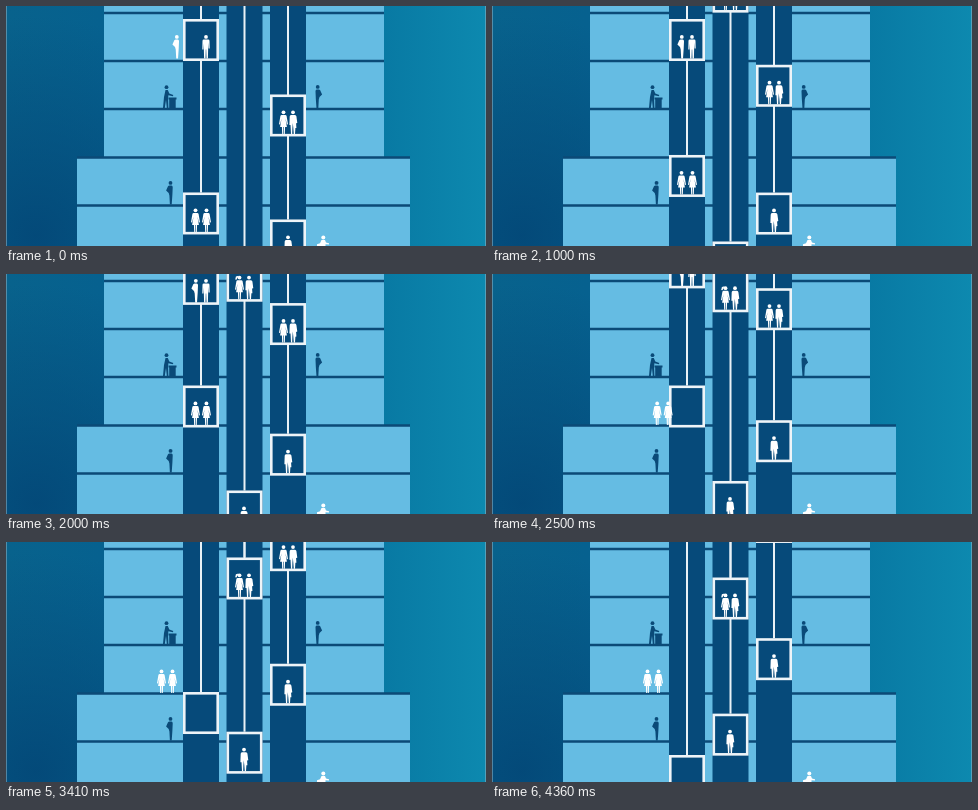
Animation of 480 by 240 pixels, one loop 4400 ms. Source, as an HTML page:

```html
<!DOCTYPE html>
<html lang="en">
<head>
<meta charset="utf-8">
<title>Elevators</title>
<style>
html, body { margin: 0; width: 100%; height: 100%; overflow: hidden; background: #075a8b; }
svg { display: block; width: 100vw; height: 100vh; }
</style>
</head>
<body>
<svg viewBox="0 0 480 240" preserveAspectRatio="none">
  <defs>
    <linearGradient id="sky">
      <stop offset="0" stop-color="#08628c"/>
      <stop offset=".2" stop-color="#06618f"/>
      <stop offset=".78" stop-color="#0879a3"/>
      <stop offset="1" stop-color="#0d89af"/>
    </linearGradient>
    <radialGradient id="shade" gradientUnits="userSpaceOnUse" cx="30" cy="230" r="220">
      <stop offset="0" stop-color="#034777" stop-opacity=".9"/>
      <stop offset="1" stop-color="#034777" stop-opacity="0"/>
    </radialGradient>
    <!-- People stand with their feet at the origin -->
    <circle id="head" cy="-21.600" r="1.900"/>
    <g id="man">
      <use href="#head"/>
      <path d="M-2.2-19h4.4q1.2 0 1.3 1.3l.2 7.7H2.6l-.3-6L1.9 0H.5L.2-9h-.4L-.5 0h-1.4l-.4-15-.3 6h-1.1l.2-8.700q.1-1.300 1.300-1.300z"/>
    </g>
    <g id="woman">
      <use href="#head"/>
      <path d="M-1.9-19h3.8q.9.1 1.2 1.1l1.4 8.2-1 .2-1.6-6 1.5 8.5H1.6L1.3 0H.3V-7h-.6v7h-1l-.3-7h-1.8l1.5-8.5-1.6 6-1-.2 1.4-8.2q.3-1 1.2-1.1z"/>
    </g>
    <g id="ponytail">
      <use href="#woman"/>
      <path d="M-1-23.500l-2.600.7-.7 3 1.200.3 1.200-2z"/>
    </g>
    <g id="coat">
      <use href="#head"/>
      <path d="M-2-19h4q1.2.2 1.4 1.4l.9 6.6-1.2.4.3 4.6-1 .1L2 0H.8L.3-6-.2-11-.6-6-.8 0H-2l-.5-9h-1.1l.3-8.4q.1-1.4 1.300-1.600z"/>
    </g>
    <g id="side">
      <use href="#head" x=".8"/>
      <path d="M-.2-19h2q1.2.3 1.2 1.8l-.3 7.2L2 0H.2L-.3-9l-.7-2.5-2.6-2.5 1.9-4.2q.5-.8 1.500-.8z"/>
    </g>
  </defs>

  <rect width="480" height="240" fill="url(#sky)"/>
  <rect width="480" height="240" fill="url(#shade)"/>
  <path d="M.5 0v240M479.500 0v240" stroke="#8fb4c6" stroke-opacity=".55"/>

  <path d="M98 0h280v151h26v89H71v-89h27z" fill="#65bce3"/>
  <path d="M98 7h280M98 55h280M98 103h280M71 151.500h333M71 199.500h333" stroke="#0b4a77" stroke-width="2.400"/>
  <path d="M177 0h36v240h-36zM220.500 0h36v240h-36zM264 0h36v240h-36z" fill="#064a7a"/>

  <g fill="#0a4a78">
    <circle cx="160.500" cy="81.200" r="1.900"/>
    <path d="M159.500 84h2.300l1.500 3.500 4 1.500-.4 1.200-4.500-1-.3 3.500.3 9.300h-1.600l-.8-8-1.200 8H157l1-11z"/>
    <path d="M162.500 91.500h8v2h-.8v8.500h-6.500v-8.500h-.7z"/>
    <use href="#side" transform="translate(312.500 102.500) scale(-1 1)"/>
    <use href="#side" x="163.700" y="198.500"/>
  </g>
  <path d="M315.500 234h3.500l1 2.500 3 .7v1.300l-3.500-.2V240h-8.500v-1.800l3-1z" fill="#fff"/>
  <circle cx="317.300" cy="231.500" r="2" fill="#fff"/>
  <g id="cables" stroke="#e9f1f6" stroke-width="2"></g>
  <g id="cabs" fill="#064a7a" stroke="#eef4f8" stroke-width="2.600"></g>
  <g id="people" fill="#fff"></g>
</svg>
<script>
const LOOP = 4400;
const CAB = { width: 33.4, height: 39.4, inset: 1.3 };
const FEET = 39.5;
const SHAFTS = { left: 195, middle: 238.5, right: 282 };
const STOP = 2000;

const since = (t, start) => Math.max(0, t - start);
const progress = (t, start, end) => Math.min(1, since(t, start) / (end - start));

const steady = (from, speed) => t => from + speed * t;
const departing = t => 13 - .033 * since(t, 1270);
const upThenDown = t => 186.5 - .0375 * Math.min(t, STOP) + .0663 * since(t, 2830);

const enter = t => -19 * (1 - progress(t, 0, 900));
const leave = t => -34 * progress(t, STOP, 2700);

const rider = (kind, dx, walk = () => 0) => ({ kind, dx, walk });
const cabs = [
  { shaft: 'left', y: departing, riders: [rider('side', -6, enter), rider('man', 5)] },
  { shaft: 'left', y: upThenDown, riders: [rider('woman', -5.5, leave), rider('woman', 5.5, leave)] },
  { shaft: 'middle', y: steady(-56.5, .0211), riders: [rider('ponytail', -5), rider('coat', 4.5)] },
  { shaft: 'middle', y: steady(254.5, -.019), riders: [rider('coat', -.5)] },
  { shaft: 'right', y: steady(88.5, -.0297), riders: [rider('woman', -4.5), rider('coat', 5)] },
  { shaft: 'right', y: steady(213.5, -.0269), riders: [rider('coat', 0)] }
];

function set(node, attrs) {
  for (const key in attrs) node.setAttribute(key, attrs[key]);
}

function add(parentId, tag, attrs) {
  const node = document.createElementNS('http://www.w3.org/2000/svg', tag);
  set(node, attrs);
  return document.getElementById(parentId).appendChild(node);
}

for (const cab of cabs) {
  const x = cab.x = SHAFTS[cab.shaft];
  cab.cable = add('cables', 'line', { x1: x, x2: x, y1: -60 });
  cab.box = add('cabs', 'rect', { x: x - CAB.width / 2, width: CAB.width, height: CAB.height });
  for (const person of cab.riders) person.node = add('people', 'use', { href: '#' + person.kind });
}

function draw(t) {
  for (const { x, y, cable, box, riders } of cabs) {
    const top = y(t);
    set(cable, { y2: top });
    set(box, { y: top + CAB.inset });
    for (const { dx, walk, node } of riders) {
      // Those who walk out stay on the floor where the cab stopped
      const floor = walk === leave ? y(Math.min(t, STOP)) : top;
      set(node, { x: x + dx + walk(t), y: floor + FEET });
    }
  }
}

const start = performance.now();
function tick(now) {
  draw(Math.max(0, now - start) % LOOP);
  requestAnimationFrame(tick);
}
draw(0);
requestAnimationFrame(tick);
</script>
</body>
</html>
```
